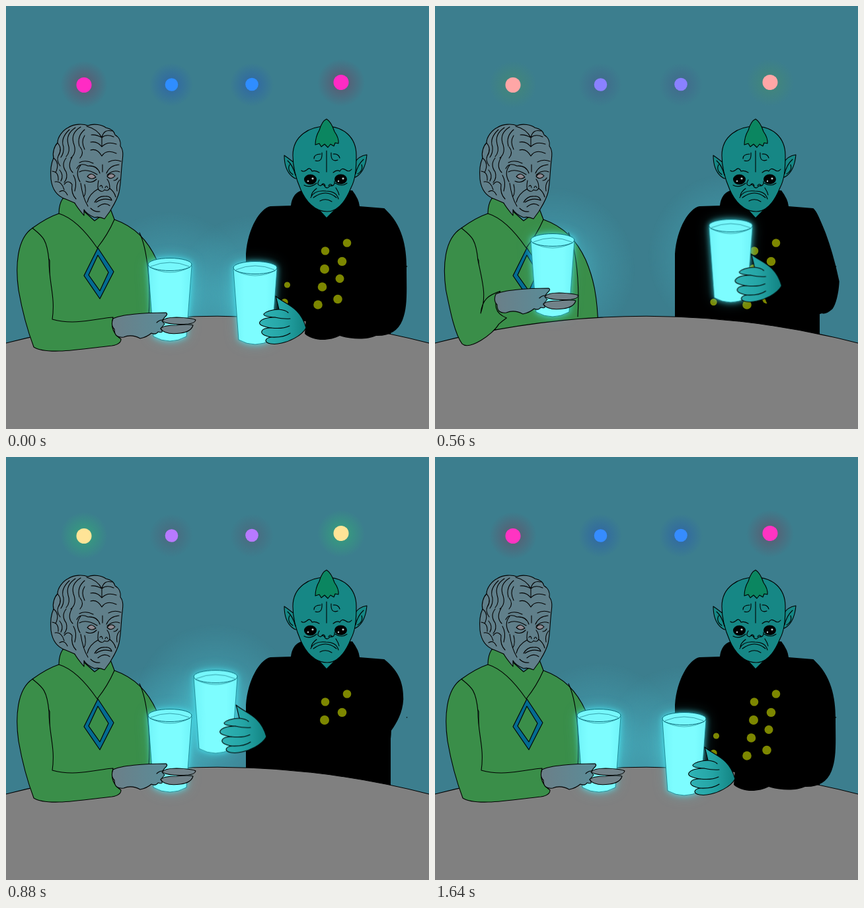
Animation of 640 by 640 pixels, one loop 1680 ms. Source, as an HTML page without scripts:

```html
<!DOCTYPE html>
<html lang="en">
<head>
<meta charset="utf-8">
<title>Two aliens toasting</title>
<style>
html, body { margin: 0; height: 100%; overflow: hidden; background: #3c7e8e; }
svg { display: block; width: 100vw; height: 100vh; }
.line { fill: none; stroke: #000; stroke-width: 1.1; stroke-linecap: round; stroke-linejoin: round; }
.ink { stroke: #000; stroke-width: 1.1; stroke-linejoin: round; }
.left, .right, .sleeve-l, .sleeve-r, .drops { animation: 1680ms linear infinite; }
.left { animation-name: left; }
.right { animation-name: right; }
.sleeve-l { animation-name: sleeve-l; fill: #3a8e49; }
.sleeve-r { animation-name: sleeve-r; }
.drops { animation-name: drops; }
.halo { filter: drop-shadow(0 0 4px #4af4ffb0) drop-shadow(0 0 9px #4af4ff40); }
.buttons { fill: #7d8700; }

/* each arm: rest, pull back, swing to the clink, hold, return */
@keyframes left {
  0%, 11.9%, 51.8%, 100% { transform: translate(248px, 391px); animation-timing-function: cubic-bezier(.5, 0, .65, 1); }
  28.57% { transform: translate(157px, 354px); animation-timing-function: cubic-bezier(.6, 0, .9, .4); }
  36.9%, 38.4% { transform: translate(275px, 354px); animation-timing-function: ease-in-out; }
}
@keyframes right {
  0%, 11.9%, 69.05%, 100% { transform: translate(377px, 396px); animation-timing-function: cubic-bezier(.5, 0, .65, 1); }
  28.57% { transform: translate(476px, 333px); animation-timing-function: cubic-bezier(.6, 0, .9, .4); }
  36.9%, 49.4% { transform: translate(314px, 329px); animation-timing-function: ease-in-out; }
}
@keyframes sleeve-l {
  0%, 11.9%, 51.8%, 100% { d: path("M40 336C16 352 14 395 19 430C26 470 36 500 42 516C62 529 120 518 160 514Q174 512 174 504Q156 492 162 471C140 472 105 484 70 474C75 440 65 420 65 385C62 352 55 348 40 336Z"); animation-timing-function: cubic-bezier(.5, 0, .65, 1); }
  28.57% { d: path("M40 336C13 352 11 395 16 430C23 463 28 497 38 513C46 524 77 497 85 481Q86 477 89 473Q60 463 79 432C65 437 61 444 65 469C76 440 74 420 65 385C62 352 55 348 40 336Z"); animation-timing-function: cubic-bezier(.6, 0, .9, .4); }
  36.9%, 38.4% { d: path("M40 336C16 352 14 395 19 430C24 462 40 495 55 502C80 508 135 498 150 483Q170 478 198 467Q182 455 190 430C155 439 120 443 88 446C88 440 66 420 65 385C62 352 55 348 40 336Z"); animation-timing-function: ease-in-out; }
}
@keyframes sleeve-r {
  0%, 11.9%, 69.05%, 100% { d: path("M572 306C600 330 606 365 606 395C606 430 608 455 600 475Q590 500 560 499C545 506 520 504 505 499C490 507 465 508 452 496L455 461C480 460 490 452 540 452Z"); animation-timing-function: cubic-bezier(.5, 0, .65, 1); }
  28.57% { d: path("M572 306C584 323 603 378 614 428C613 450 608 468 604 470Q593 473 589 466C578 469 553 475 538 471C530 463 528 457 527 451L502 396C520 397 543 399 547 399Z"); animation-timing-function: cubic-bezier(.6, 0, .9, .4); }
  36.9%, 49.4% { d: path("M572 306C597 325 601 345 601 365C600 385 590 400 582 411Q582 440 570 460C545 470 480 468 450 467C430 466 400 460 385 440L375 404C420 404 480 403 540 404Z"); animation-timing-function: ease-in-out; }
}
@keyframes drops {
  0%, 35.8% { visibility: hidden; transform: translateY(6px); }
  36% { visibility: visible; transform: translateY(6px); }
  38.1% { visibility: visible; transform: none; }
  42% { visibility: visible; transform: translateY(-8px); }
  46.4% { visibility: visible; transform: translateY(8px); }
  46.5%, 100% { visibility: hidden; transform: translateY(8px); }
}

.warm, .cool, .warm-glow stop, .cool-glow stop { animation: 1680ms linear infinite; }
.warm { animation-name: warm; }
.cool { animation-name: cool; }
.warm-glow stop { animation-name: warm-glow; }
.cool-glow stop { animation-name: cool-glow; }
@keyframes warm { 0%, 100% { fill: #ff2bc4; } 51.5% { fill: #ffe896; } }
@keyframes cool { 0%, 100% { fill: #2f8dff; } 51.5% { fill: #bb7aff; } }
@keyframes warm-glow { 0%, 100% { stop-color: #5a5b72; } 51.5% { stop-color: #359e7e; } }
@keyframes cool-glow { 0%, 100% { stop-color: #2e66a6; } 51.5% { stop-color: #4b697d; } }
</style>
</head>
<body>
<svg viewBox="0 0 640 640">
  <defs>
    <radialGradient id="warmGlow" class="warm-glow">
      <stop offset=".2" stop-opacity=".9"/><stop offset="1" stop-opacity="0"/>
    </radialGradient>
    <radialGradient id="coolGlow" class="cool-glow">
      <stop offset=".2" stop-opacity=".8"/><stop offset="1" stop-opacity="0"/>
    </radialGradient>
    <radialGradient id="aura">
      <stop offset=".2" stop-color="#4fd0dc" stop-opacity=".6"/>
      <stop offset=".6" stop-color="#48b6c6" stop-opacity=".25"/>
      <stop offset="1" stop-color="#48b6c6" stop-opacity="0"/>
    </radialGradient>
    <linearGradient id="drink">
      <stop stop-color="#70f4f9"/><stop offset=".25" stop-color="#7dfdff"/>
      <stop offset=".75" stop-color="#7dfdff"/><stop offset="1" stop-color="#70f4f9"/>
    </linearGradient>
    <linearGradient id="greySkin">
      <stop stop-color="#6b7f88"/><stop offset="1" stop-color="#5a8c98"/>
    </linearGradient>
    <linearGradient id="tealSkin">
      <stop stop-color="#30b4b6"/><stop offset=".5" stop-color="#25a5a6"/><stop offset="1" stop-color="#128382"/>
    </linearGradient>
    <circle id="auraSpot" cy="45" r="125" fill="url(#aura)"/>
    <g id="glass" stroke="#0b6b78" stroke-width="1">
      <path d="M-33 2L-25 109Q0 123 25 109L33 2Z" fill="url(#drink)" stroke-width=".7"/>
      <ellipse rx="33" ry="9.5" fill="#76f7fb"/>
      <path d="M-31 4Q0 20 31 4M-29 3Q0 -9 29 3" fill="none" stroke-width=".6"/>
    </g>
  </defs>

  <rect width="640" height="640" fill="#3c7e8e"/>

  <!-- wall lights -->
  <g fill="url(#warmGlow)"><circle cx="118" cy="119" r="36"/><circle cx="507" cy="116" r="36"/></g>
  <g fill="url(#coolGlow)"><circle cx="250" cy="119" r="33"/><circle cx="372" cy="119" r="33"/></g>
  <g class="warm"><circle cx="118" cy="119.5" r="11.5"/><circle cx="507" cy="115.5" r="11.5"/></g>
  <g class="cool"><circle cx="250.5" cy="119" r="9.8"/><circle cx="372" cy="118.5" r="9.8"/></g>

  <use href="#auraSpot" class="left"/>
  <use href="#auraSpot" class="right"/>

  <!-- left torso -->
  <path class="ink" fill="#3a8e49" d="M40 336C55 325 68 318 80 314Q80 300 86 291Q94 290 104 298L134 325L158 307L164 323C195 334 214 354 228 384C240 412 246 440 247 490H66V385Z"/>
  <path class="line" d="M80 314C100 320 120 340 138 366Q154 346 164 323M202 343C214 368 219 420 216 470"/>
  <path class="ink" fill="#046b91" fill-rule="evenodd" d="M139 366L163 402L142 443L118 408ZM139 377L125 407L142 431L155 403Z"/>

  <!-- left head -->
  <path class="ink" fill="#607f8a" d="M90 292C78 288 70 278 68 262C67 250 68 238 72 230C70 222 73 212 78 207C78 198 86 188 94 184C103 178 117 178 124 181C133 177 146 180 151 184C160 186 164 190 165 195C172 199 174 206 173 212C178 218 177 226 176 234C174 250 174 268 171 282C168 294 161 304 157 311L149 322Q141 318 134 320Q122 315 118 308V317Q107 304 104 298Z"/>
  <g class="line">
    <path d="M122 182Q138 186 145 199Q148 186 160 189M145 199Q136 194 129 195M145 199Q152 193 163 198M145 213Q138 204 128 206M145 213Q153 204 167 209M145 227Q138 215 128 218M145 227Q152 216 167 223M145 199V213M146 240V251"/>
    <path d="M113 183Q98 192 102 207Q108 222 98 230M105 184Q90 194 94 209Q98 220 91 228M96 187Q82 200 87 213Q88 222 83 229M119 187Q107 197 111 212M119 196Q113 205 119 217M112 213Q119 222 112 230"/>
    <path d="M78 207Q86 216 79 227Q76 234 82 242M72 230Q82 238 75 252M70 250Q80 251 79 264M91 230Q83 240 91 251Q94 260 88 267M100 229Q92 243 101 252M74 266Q84 264 88 278M88 270Q94 262 100 270Q98 284 106 292M81 248Q88 256 83 265M102 256Q108 266 104 280M81 281Q88 276 93 286"/>
    <path d="M107 246Q112 236 124 242Q138 241 142 253M111 251Q122 245 138 255M152 253Q157 241 171 240M153 256Q162 247 172 251M111 237Q120 232 132 238M155 236Q164 231 174 235M113 241Q104 252 112 266M172 263Q166 270 168 280"/>
    <path d="M140 264Q138 274 140 278Q146 283 149 278Q155 281 157 275Q157 267 153 262M142 273q3 -4 4 2M150 275q2 -5 4 0M139 277Q126 284 123 297M157 276Q164 281 166 289M134 297Q140 287 150 288Q158 287 160 294M136 297Q148 289 160 294M139 304Q149 296 157 302M113 268Q116 290 124 303M119 270Q122 282 118 288M128 306Q134 312 142 311M121 265Q130 269 137 262M163 264Q167 264 169 260"/>
  </g>
  <g class="ink" fill="#8f8a91"><path d="M123 258Q129 250 136 259Q129 264 123 258Z"/><path d="M153 258Q159 250 165 257Q159 264 153 258Z"/></g>

  <!-- right torso -->
  <circle cx="606.5" cy="394" r=".8"/>
  <path d="M363 490V375C366 335 385 306 400 303L431 302Q433 284 447 279H524Q534 292 535 303L572 306C580 312 588 335 590 360C591 385 587 400 582 411V505Z"/>
  <path fill="#168a88" d="M475 309H496L485 320Z"/>
  <g class="buttons">
    <circle cx="516" cy="358.5" r="6.3"/><circle cx="483" cy="370.5" r="6.3"/>
    <circle cx="508.5" cy="386.5" r="6.8"/><circle cx="482" cy="398" r="7"/>
    <circle cx="505" cy="412.5" r="6.5"/><circle cx="478.5" cy="425" r="6.8"/>
    <circle cx="502" cy="443.5" r="6.8"/><circle cx="472" cy="452" r="6.8"/>
    <circle cx="425.5" cy="422" r="4.6"/><circle cx="421.5" cy="448" r="5.2"/>
  </g>

  <!-- right head -->
  <g class="ink" fill="#168785">
    <path d="M437 238Q427 230 421 226Q421 248 433 258Q440 264 443 259ZM527 238Q533 227 546 225Q544 248 532 257Q525 262 524 257Z"/>
    <path d="M434 226C434 196 460 182 484 182C510 182 530 198 530 226C530 245 529 262 522 275C514 295 502 311 486 311C466 311 453 294 446 278C439 262 434 245 434 226Z"/>
    <path fill="#0b8660" d="M485 171Q492 175 497 190Q504 200 503 208L498 207L496 212L491 209L487 214L482 209L477 213L474 208L468 210Q468 198 474 188Q478 174 485 171Z"/>
  </g>
  <g class="line">
    <path d="M426 234Q434 241 438 256M429 240Q425 249 434 255M541 232Q532 240 529 254M538 240Q541 249 532 254"/>
    <path d="M485 219V251M478 222Q479 237 468 234M492 222Q491 237 502 233M476 224Q466 224 466 231M495 224Q503 223 505 230M447 249Q450 252 455 248Q460 243 463 250Q468 248 474 252M495 252Q501 247 505 250Q508 244 514 248Q519 252 523 247"/>
    <path d="M474 263Q469 271 476 272Q480 268 483 274Q487 277 490 272Q498 273 497 265M478 270q3 -3 5 2M488 272q2 -4 5 -1M461 290Q466 278 484 280Q500 280 503 292M465 290Q484 276 500 290M470 276Q463 281 462 287M499 275Q503 281 504 286M475 295Q484 290 493 296M451 271Q460 276 470 268M498 268Q508 274 516 268"/>
  </g>
  <ellipse cx="460.5" cy="262.5" rx="9.5" ry="7.8"/><ellipse cx="506.5" cy="262" rx="9.5" ry="7.5"/>
  <g fill="#b5c8c8"><circle cx="464" cy="261" r="1.6"/><circle cx="457" cy="265" r="1.2"/><circle cx="510" cy="261" r="1.6"/><circle cx="503" cy="265" r="1.2"/></g>

  <path class="ink" fill="#808080" d="M-2 510.5Q320 428 642 510.5V642H-2Z"/>

  <!-- right arm and drink -->
  <path class="sleeve-r"/>
  <g class="right">
    <use href="#glass" class="halo"/>
    <path class="ink" fill="url(#tealSkin)" d="M31 43C44 55 68 58 77 91C70 104 50 112 40 114C28 117 16 115 16 110Q17 106 24 105Q8 102 10 96Q12 91 24 91Q4 88 7 82Q12 75 30 75Q12 74 13 70Q18 64 36 63Q33 50 31 43Z"/>
    <path class="line" d="M36 63Q46 64 50 68M30 75Q44 78 53 77M24 91Q42 93 52 88M24 105Q43 106 53 99"/>
  </g>

  <!-- left arm and drink -->
  <g class="left"><use href="#glass" class="halo"/></g>
  <path class="sleeve-l ink"/>
  <g class="left ink">
    <path fill="url(#greySkin)" d="M-86 82C-75 76 -40 73 -6 73Q-2 75 -8 80Q-14 86 -8 90L-14 97Q-8 105 -18 102Q-21 107 -28 104Q-35 110 -45 112Q-58 105 -70 110Q-84 112 -84 98Q-90 92 -86 82Z"/>
    <path fill="#718289" d="M-12 86Q-8 80 10 80Q34 81 39 84Q38 89 28 90Q0 92 -12 86Z"/>
    <path fill="#718289" d="M-14 97Q-10 92 10 92Q30 90 35 92Q32 102 16 104Q-8 107 -14 97Z"/>
    <path class="line" d="M-20 88Q-16 84 -11 84"/>
  </g>

  <g class="drops" fill="none" stroke="#f4ffff" stroke-linecap="round">
    <path stroke-width="5" d="M282 325L288 328L298 333M293 355L302 353L306 349"/>
    <path stroke-width="4" d="M290 311h.1M296 321v2M278 354h1M287 357h2"/>
  </g>
</svg>
</body>
</html>
```
